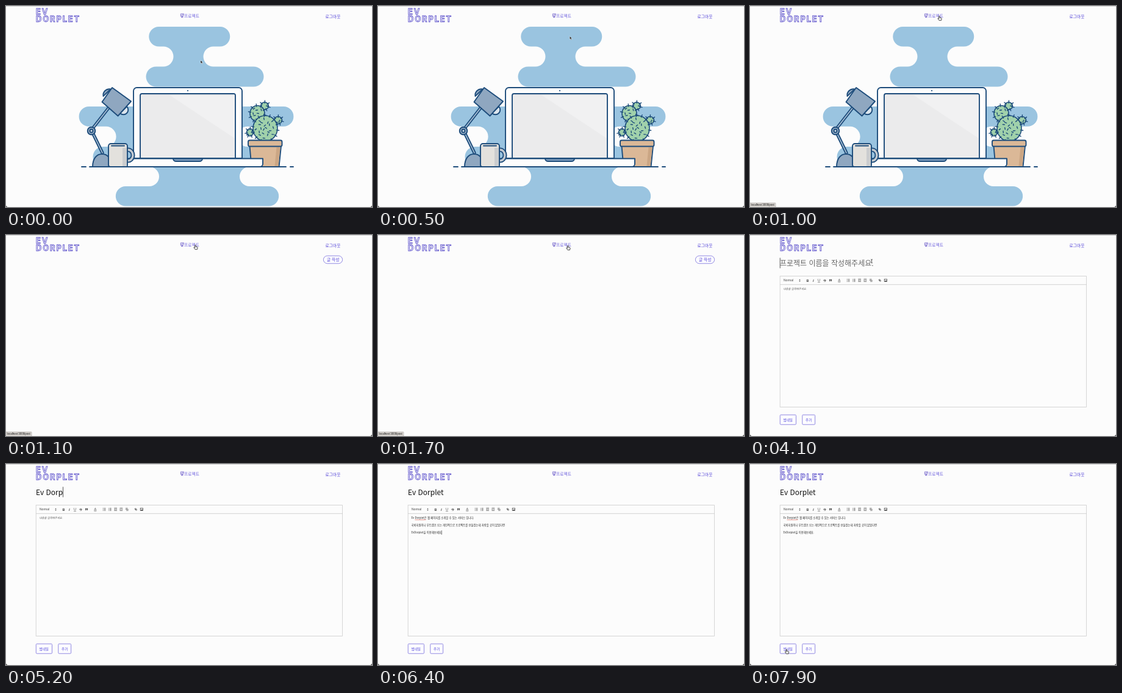
Animation of 600x330 px, one loop 8 s. Source, as an HTML page:

```html
<!DOCTYPE html>
<html lang="ko">
<head>
<meta charset="utf-8">
<title>Ev Dorplet</title>
<style>
  html, body { margin: 0; width: 100%; height: 100%; overflow: hidden; background: #fcfcfc; }
  svg { display: block; width: 100vw; height: 100vh; }
  text { font-family: "Noto Sans CJK KR", "Noto Sans CJK", "Noto Sans", sans-serif; white-space: pre; }
  .logo { font: 700 12.9px Inter, sans-serif; letter-spacing: 1.9px; fill: #fdfdff; stroke: #5448c8; stroke-width: .8; }
  .nav { font-size: 6.75px; fill: #5444d8; }
  .btn { font-size: 5.6px; fill: #5548dd; }
  .body { font-size: 4.35px; fill: #222; }
  .ui { font-family: "Liberation Sans", Arial, sans-serif; }
  .ink { stroke: #1d4c7b; stroke-width: 1.9; stroke-linejoin: round; stroke-linecap: round; }
  .tool { stroke: #444; stroke-width: .75; fill: none; }
  .sky { fill: #9ac4e0; }
  .box { fill: none; stroke: #ccc; stroke-width: .8; }
  .frame { fill: #fdfdff; stroke: #857cdf; stroke-width: .9; }
  .ink .arm { fill: none; stroke-width: 5.2; }
  .ink .arm.core { stroke: #a9c0d6; stroke-width: 1.7; }
  .ink .handle { fill: none; stroke-width: 7; }
  .ink .handle.core { stroke: #c3cad1; stroke-width: 3.3; }
  #cactus ellipse { stroke-width: 1.6; }
  #cactus path { fill: none; stroke-width: 1.4; }
</style>
</head>
<body>
<svg viewBox="0 0 600 330" preserveAspectRatio="none">
  <rect width="600" height="330" fill="#fcfcfc"/>
  <rect width="600" height="1" fill="#d2d2d2"/>

  <g id="home">
    <g class="sky">
      <path d="M250.500 34H351a16.200 16.200 0 0 1 0 32.500H340a16.400 16.400 0 0 0 0 33H406a16.500 16.500 0 0 1 0 33H246a16.500 16.500 0 0 1 0-33H258a16.400 16.400 0 0 0 0-33H250.500a16.200 16.200 0 0 1 0-32.500z"/>
      <path d="M136 165H455a16.400 16.400 0 0 1 0 32.800H396a16.600 16.600 0 0 0 0 33.200H415V264H159a16.400 16.400 0 0 1 0-33H164a16.600 16.600 0 0 0 0-33.200H136a16.400 16.400 0 0 1 0-32.800z"/>
      <path d="M235 264H399a16 16 0 0 0 0 32H431a16.200 16.200 0 0 1 0 32.400H196a16.200 16.200 0 0 1 0-32.400H235a16 16 0 0 0 0-32z"/>
    </g>

    <g id="cactus" class="ink" fill="#a0d1ab"></g>
    <g class="ink" fill="#dbb897">
      <path d="M399.500 230L402.500 264H447.500L451 230z"/>
      <rect x="397" y="220.500" width="55.500" height="10" rx="2.500"/>
    </g>
    <path d="M443.500 232H449.500L446.500 263H440.500z" fill="#cba684"/>

    <g class="ink" fill="#fdfdfd">
      <path fill="none" d="M124 264H131M137 264H459M466 264H471"/>
      <path d="M209 250V139.500a5.500 5.500 0 0 1 5.500-5.500H381.500a5.500 5.500 0 0 1 5.500 5.500V250z"/>
      <path fill="#ebebec" d="M220 250V147a3 3 0 0 1 3-3H373a3 3 0 0 1 3 3V250z"/>
      <path d="M175 250.500H421V259a5 5 0 0 1-5 5H180a5 5 0 0 1-5-5z"/>
      <path fill="#7f9fc0" d="M274 250.500H322a5 4.500 0 0 1-5 4.500H279a5 4.500 0 0 1-5-4.500z"/>
    </g>
    <path d="M267 145.500H374.500V217z" fill="#f1f1f2"/>
    <path d="M224 146H373" stroke="#d5d9de"/>
    <circle cx="298" cy="139" r="1.100" fill="#1d4c7b"/>
    <path d="M212 262H416" stroke="#e6eaee"/>

    <g class="ink" fill="#8fa7c0">
      <path d="M142 264C142 251 148 243 157.500 243S173 251 173 264z"/>
      <path class="arm" d="M141 206L158 241M142 201L170 165"/>
      <path class="arm core" d="M141 206L158 241M142 201L170 165"/>
      <path d="M159.500 148a10 10 0 0 1 12-11.500z"/>
      <path fill="#dce6ee" d="M187 176a7.500 7.500 0 0 0 11-11z"/>
      <path d="M174 134L205 156.500L183.500 180.500L157.500 157.500z"/>
      <circle cx="140" cy="205" r="6.300"/>
      <circle cx="140" cy="205" r="2.500" fill="#dce6ee"/>
    </g>

    <g class="ink">
      <path class="handle" d="M198 236H200a8 9 0 0 1 0 18H198"/>
      <path class="handle core" d="M198 236H200a8 9 0 0 1 0 18H198"/>
      <path fill="#e3e1dd" d="M168 261V230a4 4 0 0 1 4-4H195a4 4 0 0 1 4 4V261a3 3 0 0 1-3 3H171a3 3 0 0 1-3-3z"/>
      <path d="M173 229.500H194"/>
    </g>
    <path d="M191 233H198V263H191z" fill="#cbcdcf"/>
  </g>

  <g id="list">
    <rect id="pill" x="520.400" y="34.200" width="31.200" height="12.600" rx="6.300" class="frame"/>
    <text id="pillText" class="nav" x="526" y="43">글 작성</text>
  </g>

  <g id="write">
    <text id="title" x="49" y="51" font-size="12"></text>
    <path id="titleCaret" stroke="#111" stroke-width=".7"/>
    <rect class="box" x="49.200" y="67.600" width="502.400" height="214.800"/>
    <path class="box" d="M49 81.400H552"/>
    <g fill="#444">
      <text class="ui" x="55" y="76.400" font-size="5">Normal</text>
      <path d="M80.300 74.100L81.500 72.500L82.700 74.100zM80.300 75.100L81.500 76.700L82.700 75.100z"/>
      <g font-size="5.600" font-weight="700" text-anchor="middle">
        <text class="ui" x="94.600" y="76.500">B</text>
        <text class="ui" x="103.700" y="76.500" font-style="italic">I</text>
        <text class="ui" x="113" y="76" font-weight="400" text-decoration="underline">U</text>
        <text class="ui" x="122.500" y="76.500" font-weight="400">S</text>
        <text class="ui" x="146.300" y="76" font-weight="400">A</text>
      </g>
      <path d="M130 72.800h1.700v2l-.8 1.500h-.9l.5-1.500h-.5zM132.400 72.800h1.700v2l-.8 1.500h-.9l.5-1.500h-.5z"/>
      <circle cx="168.700" cy="72.700" r=".5"/><circle cx="168.700" cy="74.500" r=".5"/><circle cx="168.700" cy="76.300" r=".5"/>
      <path d="M179 73.500V75.600L177.400 74.500zM186.700 73.500V75.600L188.300 74.500z"/>
      <path d="M220.700 76L221.900 74.500L222.700 75.200L223.500 74.300L224.200 76z"/>
    </g>
    <g class="tool">
      <path d="M120.200 74.500H124.800M144.300 77H148.300M159.300 72v1.200M159.300 74v1M159.300 75.800v1.200"/>
      <path d="M160.800 72.700h2.500m-2.500 1.800h2.500m-2.500 1.800h2.500M170 72.700h2.700m-2.700 1.800h2.700m-2.700 1.800h2.700"/>
      <path d="M177.300 72.400h4.700m-2.300 2h2.300m-4.700 2h4.700M186.500 72.400h4.700m-2.300 2h2.300m-4.700 2h4.700M196 72.700h3.500m-3.500 1.800h4.700m-3.500 1.800h3.500"/>
      <rect x="-2" y="-1" width="2.300" height="2" rx="1" transform="translate(212.800 74.500) rotate(45)"/>
      <rect x="-.3" y="-1" width="2.300" height="2" rx="1" transform="translate(212.800 74.500) rotate(45)"/>
      <rect x="220.200" y="72.600" width="4.400" height="3.800"/>
    </g>
    <text id="hint" class="body" x="54.500" y="90.200" font-style="italic" fill-opacity=".75">내용을 입력해주세요.</text>
    <g id="story" class="body">
      <text x="54.500" y="90.200">Ev Dorplet은 웹 페이지를 소개할 수 있는 서비스 입니다.</text>
      <text x="54.500" y="102">국비지원이나 부트캠프 또는 개인적으로 프로젝트를 만들었는데 자랑할 곳이 없었다면</text>
      <text x="54.500" y="114">EvDorplet을 이용해보세요.</text>
    </g>
    <path id="spell" d="M60.500 91.700H78.500" stroke="#e06a5c" stroke-width=".7"/>
    <path id="bodyCaret" stroke="#111" stroke-width=".6"/>
    <rect class="frame" x="49.300" y="295.300" width="26.200" height="15.900" rx="1.300"/>
    <text class="btn" x="54.500" y="305.500">썸네일</text>
    <rect class="frame" x="85.800" y="295.300" width="20.800" height="15.900" rx="1.300"/>
    <text class="btn" x="91.100" y="305.500">추가</text>
  </g>

  <text class="logo" x="49" y="14">EV</text>
  <text class="logo" x="49" y="25.800">DORPLET</text>
  <g fill="none" stroke="#6a5ac8" stroke-width=".8">
    <path d="M290 17H286.400V12.900H291.400V14.200M287 18.700H290.500M288.700 17V18.700"/>
    <circle cx="289.800" cy="15.400" r="1.500"/>
  </g>
  <text class="nav" x="292" y="18.500" fill-opacity=".85">프로젝트</text>
  <text class="nav" x="523.500" y="19.700" font-weight="500">로그아웃</text>

  <path d="M0 326.500V330H3.500A3.500 3.500 0 0 1 0 326.500zM600 326.500V330H596.500A3.500 3.500 0 0 0 600 326.500z" fill="#222"/>
  <g id="status">
    <rect id="statusBox" x="-1" y="323.200" height="8" rx="1" fill="#dcd8d4" stroke="#a9a5a1" stroke-width=".6"/>
    <text id="statusText" class="ui" x="1.500" y="328" font-size="4.450" fill="#111"></text>
  </g>

  <g id="mouse">
    <path id="arrow" d="M0 0V5.200L1.200 4.200L2.100 6.100L3 5.700L2.200 3.900H3.700z" fill="#111" stroke="#fff" stroke-width=".5"/>
    <path id="hand" d="M-.8-.4a.7.7 0 0 1 1.400 0V1.700L2.900 2.200a1 1 0 0 1 .8 1.100L3 6.200H-.5L-2.400 3.500a.6.6 0 0 1 .9-.8L-.8 3.300z" fill="#f4f4f4" stroke="#333" stroke-width=".85"/>
    <path id="beam" d="M-1.400-3Q0-3 0-2.200Q0-3 1.400-3M0-2.200V2.200M-1.400 3Q0 3 0 2.200Q0 3 1.400 3" fill="none" stroke="#222" stroke-width=".75"/>
  </g>
</svg>
<script>
const $ = id => document.getElementById(id);
const show = (id, on) => { $(id).style.display = on ? "" : "none"; };
const within = (t, a, b) => t >= a && t < b;

// Cactus: round pads with spines on the rim and scattered inside
let seed = 11;
const rand = () => (seed = seed * 16807 % 2147483647) / 2147483647;
const pads = [[424, 164, 6.5, 6], [446, 187.5, 6.5, 6], [400, 207.5, 5.5, 6], [412, 176.5, 12, 13], [425, 201, 20, 21]];
let art = "";
for (const [x, y, rx, ry] of pads) {
  let d = "";
  const rim = Math.round(rx * .5 + 4);
  for (let i = 0; i < rim; i++) {
    const a = (i + .3) / rim * Math.PI * 2, c = Math.cos(a), s = Math.sin(a);
    d += `M${x + c * (rx - 1.5)} ${y + s * (ry - 1.5)}L${x + c * (rx + 2.8)} ${y + s * (ry + 2.8)}`;
  }
  const inner = Math.round(rx * ry / 20);
  for (let i = 0; i < inner; i++) {
    const a = i * 2.4, r = .8 * Math.sqrt((i + .5) / inner), b = rand() * 6.3;
    const px = x + Math.cos(a) * r * rx, py = y + Math.sin(a) * r * ry;
    d += `M${px} ${py}l${Math.cos(b) * 3} ${Math.sin(b) * 3}`;
  }
  art += `<ellipse cx="${x}" cy="${y}" rx="${rx}" ry="${ry}"/><path d="${d}"/>`;
}
$("cactus").innerHTML = art;

// Pointer stops: time, x, y
const stops = [
  [0, 319, 89], [100, 319, 89], [850, 310.5, 17.5], [1600, 310.5, 17.5], [1720, 311.5, 18.5],
  [2100, 578, 48], [2400, 544, 43], [2700, 527, 37], [3000, 527, 37], [3300, 208, 45],
  [3700, 199.5, 43], [5600, 199.5, 43], [5950, 190, 138], [7000, 190, 138], [7800, 60, 305.5], [8000, 60, 305.5]
];
function pointer(t) {
  const i = stops.findIndex(s => s[0] > t);
  const [t0, x0, y0] = stops[i - 1], [t1, x1, y1] = stops[i];
  const p = (t - t0) / (t1 - t0), e = p * p * (3 - 2 * p);
  return [x0 + (x1 - x0) * e, y0 + (y1 - y0) * e];
}

const name = "Ev Dorplet";
const keys = [4200, 4400, 4500, 4800, 4900, 5000, 5200, 5300, 5400, 5600];
const inBox = (x, y, l, t, r, b) => x >= l && x <= r && y >= t && y <= b;

function setStatus(path) {
  show("status", path);
  if (!path) return;
  $("statusText").textContent = "localhost:3000/" + path;
  $("statusBox").setAttribute("width", path === "post" ? 43 : 45);
}

function draw(t) {
  const home = t < 1100, list = within(t, 1100, 3100), write = t >= 3100;
  const [x, y] = pointer(t);
  show("home", home);
  show("list", list);
  show("write", write);

  const hot = within(t, 2400, 3100);
  $("pill").style.fill = hot ? "#5548e2" : "";
  $("pill").style.stroke = hot ? "#5548e2" : "";
  $("pillText").style.fill = hot ? "#fff" : "";
  setStatus(within(t, 800, 1800) ? "post" : within(t, 2400, 3400) ? "write" : "");

  const typed = keys.filter(k => t >= k).length, title = $("title");
  const line = typed ? name.slice(0, typed) : "프로젝트 이름을 작성해주세요.";
  if (title.textContent !== line) title.textContent = line;
  title.setAttribute("fill", typed ? "#111" : "#666");
  show("titleCaret", within(t, 4100, 5900));
  if (write) {
    const cx = 49.3 + (typed ? title.getComputedTextLength() : 0);
    $("titleCaret").setAttribute("d", `M${cx} 37.5V54.5`);
  }

  const pasted = t >= 6300;
  show("hint", !pasted);
  show("story", pasted);
  show("spell", t >= 6400);
  show("bodyCaret", within(t, 5900, 6800));
  $("bodyCaret").setAttribute("d", pasted ? "M104.3 109V116" : "M54.6 85V92");

  show("mouse", !within(t, 4200, 5600) && !within(t, 6300, 7000));
  $("mouse").setAttribute("transform", `translate(${x} ${y})`);
  const hand = write ? t >= 7800 : hot || inBox(x, y, 285, 11, 317, 21);
  const beam = write && (inBox(x, y, 49, 36, 552, 56) || inBox(x, y, 49, 82, 552, 282));
  show("hand", hand);
  show("beam", beam && !hand);
  show("arrow", !hand && !beam);
}

const start = performance.now();
function tick() {
  draw((performance.now() - start) % 8000);
  requestAnimationFrame(tick);
}
tick();
</script>
</body>
</html>
```
